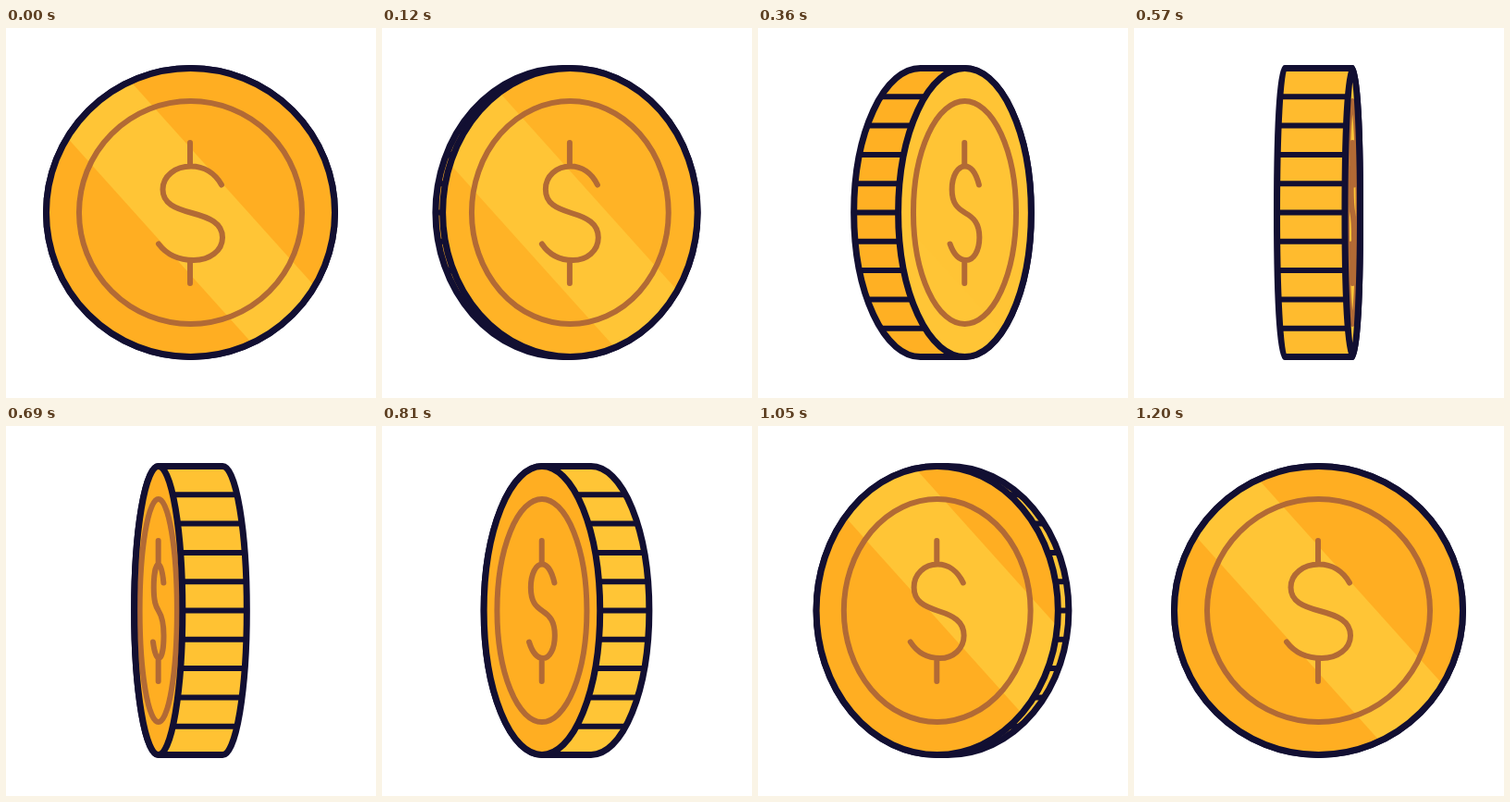
Write an HTML page with a canvas that moves like this. It is 400x400 px and loops after 1.23 s.

```html
<!DOCTYPE html>
<html>
<head>
<meta charset="utf-8">
<style>
html, body { margin: 0; width: 100%; height: 100%; overflow: hidden; background: #fff; }
canvas { display: block; }
</style>
</head>
<body>
<canvas id="stage" width="400" height="400"></canvas>
<script>
const ctx = document.getElementById('stage').getContext('2d');
const LOOP = 1230, STEP = 30, HALF = 600;
const MID = 199.5, RADIUS = 156, RING = 120.5, DEPTH = 37;
const INK = '#120f32', BROWN = '#b26a35';
const ORANGE = [255, 174, 34], YELLOW = [255, 197, 54];

const clamp = v => Math.min(1, Math.max(0, v));
const smooth = v => v * v * (3 - 2 * v);
const blend = k => `rgb(${ORANGE.map((c, i) => Math.round(c + (YELLOW[i] - c) * k))})`;

// cubic-bezier(.2, 0, .8, .8)
function easeIn(x) {
  let lo = 0, hi = 1;
  for (let i = 0; i < 24; i++) {
    const s = (lo + hi) / 2;
    const bx = .6 * (1 - s) ** 2 * s + 2.4 * (1 - s) * s * s + s ** 3;
    if (bx < x) lo = s; else hi = s;
  }
  return 2.4 * (1 - lo) * lo * lo + lo ** 3;
}

function stroke(color, width) {
  ctx.strokeStyle = color;
  ctx.lineWidth = width;
  ctx.stroke();
}

function rimPath(offset, rx) {
  ctx.beginPath();
  ctx.ellipse(MID - offset, MID, rx, RADIUS, 0, Math.PI / 2, Math.PI * 1.5);
  ctx.ellipse(MID + offset, MID, rx, RADIUS, 0, -Math.PI / 2, Math.PI / 2);
  ctx.closePath();
}

function drawRim(offset, rx, color) {
  rimPath(offset, rx);
  ctx.fillStyle = color;
  ctx.fill();
  ctx.save();
  ctx.clip();
  ctx.beginPath();
  for (let i = -4; i <= 4; i++) {
    const y = MID + i * 31.3;
    ctx.moveTo(0, y);
    ctx.lineTo(400, y);
  }
  stroke(INK, 6);
  ctx.restore();
  rimPath(offset, rx);
  stroke(INK, 7);
}

// Slanted band of light; its slope stays fixed while the face narrows.
function drawShine(shift) {
  const at = (x, y) => ctx.lineTo(x + shift + (y - MID) / 1.113, y);
  ctx.beginPath();
  at(139, 0); at(262, 0); at(262, 400); at(139, 400);
  ctx.fillStyle = blend(1);
  ctx.fill();
}

function drawDollar(cx, sx) {
  const px = x => cx + (x - MID) * sx;
  const curve = (a, b, c, d, e, f) => ctx.bezierCurveTo(px(a), b, px(c), d, px(e), f);
  ctx.beginPath();
  ctx.moveTo(px(199), 124);
  ctx.lineTo(px(199), 149);
  ctx.moveTo(px(199), 251);
  ctx.lineTo(px(199), 276);
  ctx.moveTo(px(233), 169.5);
  curve(226, 157, 214, 149.5, 200, 149.5);
  curve(183, 149.5, 169.5, 160, 169.5, 174.5);
  curve(169.5, 190, 183, 195, 201, 200);
  curve(220, 205, 234, 211, 234, 226.5);
  curve(234, 241, 220, 251, 203, 251);
  curve(186, 251, 173, 244, 165, 233.5);
  stroke(BROWN, 6);
}

function drawFace(cx, rx, base, shift) {
  const sx = rx / RADIUS;
  const oval = r => {
    ctx.beginPath();
    ctx.ellipse(cx, MID, r * sx, r, 0, 0, Math.PI * 2);
  };
  ctx.save();
  oval(RADIUS);
  ctx.clip();
  ctx.fillStyle = base;
  ctx.fill();
  drawShine(shift);
  oval(RING);
  stroke(BROWN, 6);
  drawDollar(cx, sx);
  ctx.restore();
  oval(RADIUS);
  stroke(INK, 7);
}

function draw(now) {
  const t = Math.floor(now % LOOP / STEP) * STEP;
  const leaving = t < HALF;
  const turn = 1 - Math.abs(t - HALF) / HALF;
  const rx = RADIUS * (1 - easeIn(turn));
  const offset = DEPTH * smooth(turn);

  ctx.fillStyle = '#fff';
  ctx.fillRect(0, 0, 400, 400);
  ctx.lineCap = ctx.lineJoin = 'round';
  drawRim(offset, rx, blend(smooth(clamp((t - 270) / 540))));
  if (turn < 1) {
    const base = blend(leaving ? smooth(clamp(t / 420)) : 0);
    const shift = smooth(turn) * (leaving ? -176 : 296);
    drawFace(MID + (leaving ? offset : -offset), rx, base, shift);
  }
  requestAnimationFrame(draw);
}
requestAnimationFrame(draw);
</script>
</body>
</html>
```
